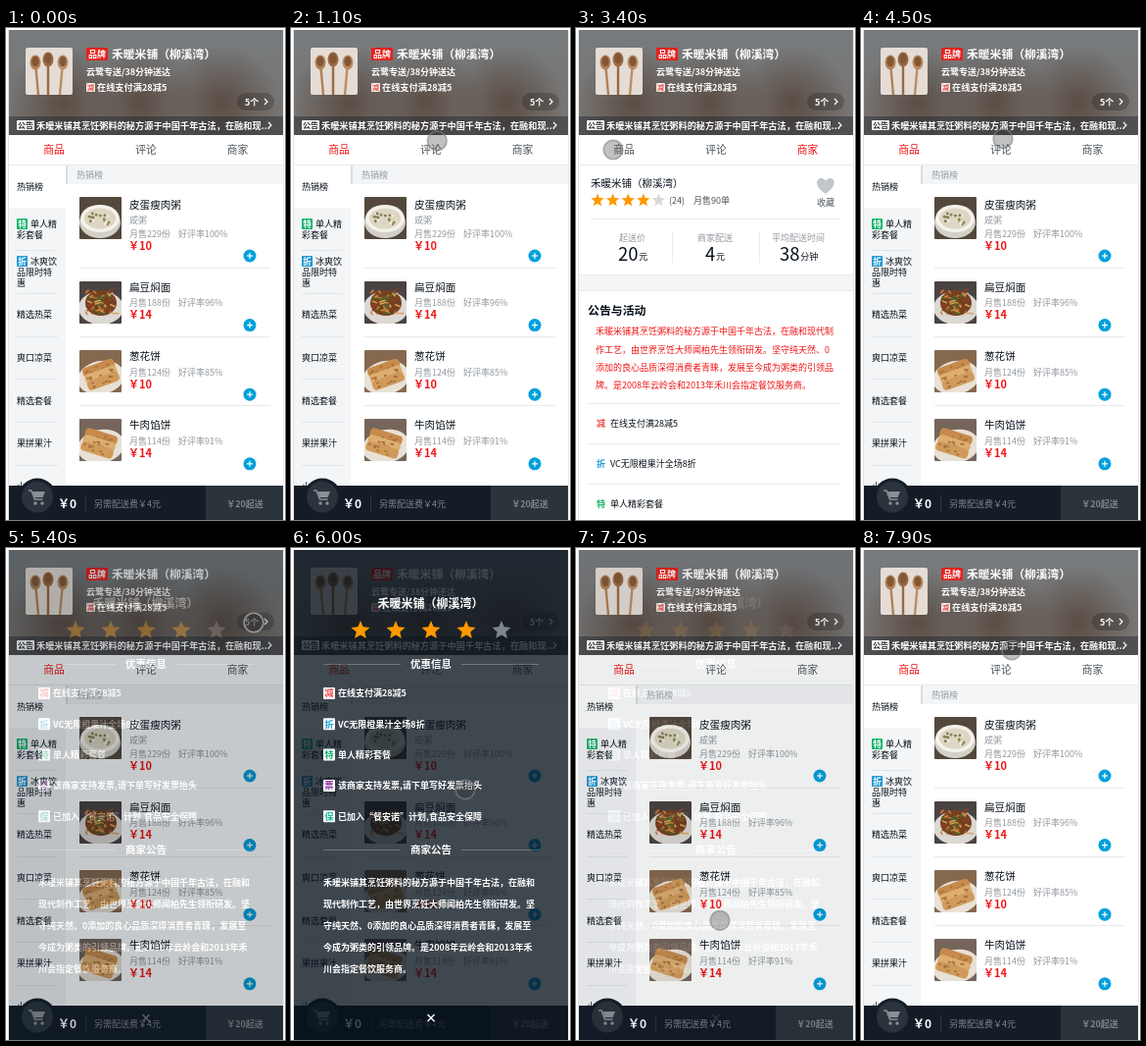
These frames come from a looping animation (285 by 501 pixels, 8000 ms). An HTML page with a canvas:

```html
<!DOCTYPE html>
<html lang="zh-CN">
<head>
<meta charset="utf-8">
<title>外卖商家</title>
<style>
html, body { margin: 0; width: 100%; height: 100%; overflow: hidden; background: #fff; }
canvas { display: block; width: 285px; height: 501px; }
</style>
</head>
<body>
<canvas id="stage"></canvas>
<script>
const W = 285, H = 501, LOOP = 8000, STEP = 100;
const FONT = '"Noto Sans CJK SC", "Noto Sans CJK", sans-serif';
const RED = '#f01414', BLUE = '#00a0dc', ORANGE = '#ff9900', INK = '#07111b',
      GREY = '#93999f', MID = '#4d555d', PALE = '#f3f5f7', LINE = '#e8ebed', GREEN = '#12b26a';
const SHOP = '禾暖米铺（柳溪湾）';
const STORY = '禾暖米铺其烹饪粥料的秘方源于中国千年古法，在融和现代制作工艺，由世界烹饪大师闻柏先生领衔研发。坚守纯天然、0添加的良心品质深得消费者青睐，发展至今成为粥类的引领品牌。是2008年云岭会和2013年禾川会指定餐饮服务商。';
const OFFERS = [['减', '#f0453f', '在线支付满28减5'], ['折', '#1a9bd7', 'VC无限橙果汁全场8折'],
  ['特', GREEN, '单人精彩套餐'], ['票', '#8b2fa0', '该商家支持发票,请下单写好发票抬头'],
  ['保', '#1cb5a3', '已加入“餐安诺”计划,食品安全保障']];

const dpr = window.devicePixelRatio || 1;
function prepare(canvas) {
  canvas.width = W * dpr;
  canvas.height = H * dpr;
  const ctx = canvas.getContext('2d');
  ctx.scale(dpr, dpr);
  return ctx;
}
const stage = prepare(document.getElementById('stage'));
const popup = prepare(document.createElement('canvas'));
let c = stage;

// y is the vertical centre of the glyphs
function text(s, x, y, size = 9, color = INK, weight = 400, align = 'left') {
  c.font = `${weight} ${size}px ${FONT}`;
  c.textAlign = align;
  c.fillStyle = color;
  c.fillText(s, x, y + size * 0.37);
}
function rect(x, y, w, h, color) {
  c.fillStyle = color;
  c.fillRect(x, y, w, h);
}
function round(x, y, w, h, r, color) {
  c.fillStyle = color;
  c.beginPath();
  c.roundRect(x, y, w, h, r);
  c.fill();
}
function disc(x, y, r, color, ry = r, turn = 0) {
  c.fillStyle = color;
  c.beginPath();
  c.ellipse(x, y, r, ry, turn, 0, 7);
  c.fill();
}
function stroke(points, color, width = 1) {
  c.strokeStyle = color;
  c.lineWidth = width;
  c.beginPath();
  points.forEach(([x, y]) => c.lineTo(x, y));
  c.stroke();
}
const hline = (x1, x2, y, color = LINE) => rect(x1, y, x2 - x1, 1, color);
const vline = (x, y1, y2, color = LINE) => rect(x, y1, 1, y2 - y1, color);
const chevron = (x, y) => stroke([[x - 1.5, y - 3], [x + 1.5, y], [x - 1.5, y + 3]], '#fff', 1.2);
function badge(glyph, x, y, size, bg, fg) {
  round(x, y, size, size, 1, bg);
  text(glyph, x + size / 2, y + size / 2, size * 0.78, fg, 700, 'center');
}
function star(x, y, r, color) {
  c.fillStyle = color;
  c.beginPath();
  for (let i = 0; i < 10; i++) {
    const a = i * Math.PI / 5 - Math.PI / 2, d = i % 2 ? r * 0.45 : r;
    c.lineTo(x + d * Math.cos(a), y + d * Math.sin(a));
  }
  c.fill();
}
function stars(x, y, r, gap, full, off = '#d5d8db') {
  for (let i = 0; i < 5; i++) star(x + i * gap, y, r, i < full ? ORANGE : off);
}
function band(y, h) {
  rect(3, y, 280, h, PALE);
  hline(3, 283, y);
  hline(3, 283, y + h - 1);
}
function random(seed) {
  return () => (seed = (seed * 16807) % 2147483647) / 2147483647;
}
function clipBox(x, y, w, h, r, draw) {
  c.save();
  c.beginPath();
  c.roundRect(x, y, w, h, r);
  c.clip();
  c.translate(x, y);
  draw();
  c.restore();
}

function shopPhoto() {
  clipBox(20, 20, 48, 48, 2, () => {
    rect(0, 0, 48, 48, '#e4dcd5');
    [[10, 15, '#b08157'], [23, 12, '#9a6a44'], [38, 15, '#bb8d64']].forEach(([x, y, color], i) => {
      stroke([[x, y], [x + 3 - i * 3, 48]], color, 2.4);
      disc(x, y, 5.5, color, 7.5);
      disc(x, y - 1, 3.6, '#835736', 5.2);
    });
  });
}
function dish(kind, x, y) {
  const rnd = random(kind * 977 + 41);
  clipBox(x, y, 43, 43, 1, () => {
    if (kind === 0) {
      rect(0, 0, 43, 43, '#54483d');
      disc(21, 26, 21, '#d3d0c8', 16);
      disc(21, 22, 20, '#f3f1ea', 14);
      disc(21, 22, 16, '#dcd6c2', 10.5);
      for (let i = 0; i < 18; i++)
        disc(10 + rnd() * 22, 15 + rnd() * 13, 1.4, ['#7c8c4b', '#f0ead6', '#8b745a'][i % 3]);
    } else if (kind === 1) {
      rect(0, 0, 43, 43, '#4a4341');
      disc(22, 27, 23, '#dcd8d4', 17);
      disc(22, 22, 16, '#74401f', 13);
      for (let i = 0; i < 46; i++) {
        const px = 6 + rnd() * 27, py = 9 + rnd() * 24;
        stroke([[px, py], [px + rnd() * 9, py + rnd() * 8 - 4]],
          ['#c88338', '#8f4020', '#4f6a2c', '#d9a25a'][i % 4], 1.5);
      }
    } else {
      rect(0, 0, 43, 43, kind === 2 ? '#85694f' : '#75655a');
      disc(22, 28, 24, '#e8e1d6', 17, -0.2);
      c.translate(21, 22);
      c.rotate(kind === 2 ? -0.35 : 0.3);
      for (let i = 0; i < 3; i++) {
        round(-17, i * 7 - 9, 34, 10, 4, ['#c78b4c', '#dcae70', '#cf9a5a'][i]);
        for (let j = 0; j < 8; j++) disc(rnd() * 28 - 14, i * 7 - 6 + rnd() * 5, 1.6, '#a8703a', 0.9);
      }
    }
  });
}

function header() {
  const g = c.createLinearGradient(0, 2, 0, 109);
  g.addColorStop(0, '#777b7e');
  g.addColorStop(1, '#77726e');
  rect(3, 2, 280, 107, g);
  clipBox(3, 2, 280, 107, 0, () => {
    [56, 134, 218].forEach(x => {
      const b = c.createRadialGradient(x, 74, 4, x, 74, 58);
      b.addColorStop(0, 'rgba(78,60,48,.65)');
      b.addColorStop(1, 'rgba(78,60,48,0)');
      rect(0, 0, 280, 107, b);
    });
  });
  shopPhoto();
  round(82, 20, 22, 13, 1, '#e4211d');
  text('品牌', 93, 26.5, 9, '#fff', 700, 'center');
  text(SHOP, 108, 26.5, 11.8, '#fff', 700);
  text('云鹭专送/38分钟送达', 82, 44.5, 9, '#fff', 700);
  badge('减', 82, 56, 9, '#f7e9e7', '#e05048');
  text('在线支付满28减5', 93, 61, 9.2, '#fff', 700);
  round(236, 66, 38, 18, 9, 'rgba(0,0,0,.2)');
  text('5个', 244, 75.5, 9, '#fff', 700);
  chevron(265.5, 75);
  rect(3, 90, 280, 19, 'rgba(7,17,27,.35)');
  round(11, 94, 18, 10, 1, '#fff');
  text('公告', 20, 99, 8, '#333', 700, 'center');
  text(STORY.slice(0, 25) + '...', 31, 99.5, 9.2, '#fff', 700);
  chevron(269.5, 99);
}
function tabs(active) {
  ['商品', '评论', '商家'].forEach((s, i) =>
    text(s, [49, 143, 236.5][i], 124.5, 10.8, i === active ? RED : MID, 400, 'center'));
  hline(3, 283, 139);
}

function goods() {
  rect(3, 140, 58, 361, PALE);
  rect(3, 140, 58, 43, '#fff');
  text('热销榜', 11, 162);
  badge('特', 11, 194, 11, GREEN, '#fff');
  text('单人精', 25, 199.5);
  text('彩套餐', 11, 211);
  badge('折', 11, 232, 11, '#2299d6', '#fff');
  text('冰爽饮', 25, 237.5);
  text('品限时特', 11, 249);
  text('惠', 11, 260);
  ['精选热菜', '爽口凉菜', '精选套餐', '果拼果汁', '小吃主食'].forEach((s, i) => text(s, 11, 292 + i * 43.7));
  for (let i = 0; i < 6; i++) hline(11, 53, Math.round(226 + i * 43.8), '#e2e5e8');

  rect(61, 140, 222, 19, PALE);
  rect(61, 140, 2, 19, '#d9dde1');
  text('热销榜', 72, 150, 9, GREY);
  [['皮蛋瘦肉粥', 229, 100, 10, 172, 180, 210], ['扁豆焖面', 188, 96, 14, 258, 264, 280],
   ['葱花饼', 124, 85, 10, 328, 334, 351], ['牛肉馅饼', 114, 91, 14, 398, 404, 421]]
    .forEach(([name, sold, rate, price, top, y, meta], i) => {
      dish(i, 75, top);
      text(name, 126, y, 10.6);
      if (i === 0) text('咸粥', 126, 195.5, 9, GREY);
      text(`月售${sold}份`, 126, meta, 9, GREY);
      text(`好评率${rate}%`, 176, meta, 9, GREY);
      text('￥' + price, 125, meta + 11.8, 11, RED, 700);
      const py = 232 + i * 70.6;
      disc(249, py, 6.5, BLUE);
      stroke([[246, py], [252, py]], '#fff', 1.2);
      stroke([[249, py - 3], [249, py + 3]], '#fff', 1.2);
      if (i < 3) hline(75, 270, 244 + i * 70);
    });
  cart();
}
function cart() {
  rect(3, 466, 280, 35, '#141d27');
  rect(204, 466, 79, 35, '#2b333b');
  disc(32, 477.5, 19, '#141d27');
  disc(32, 477.5, 16, '#2b343c');
  const grey = '#8b9095';
  stroke([[23, 471], [26, 471], [29.5, 480], [37.5, 480]], grey, 1.6);
  c.fillStyle = grey;
  c.beginPath();
  [[27, 472], [40, 472], [37.5, 478], [29.5, 478]].forEach(([x, y]) => c.lineTo(x, y));
  c.fill();
  disc(30, 484, 1.7, grey);
  disc(37, 484, 1.7, grey);
  text('￥0', 53, 484.5, 12, '#fff', 700);
  vline(81, 476, 493, '#2c353e');
  text('另需配送费￥4元', 90, 484.5, 9, '#80858a');
  text('￥20起送', 244, 484.5, 9, '#80858a', 700, 'center');
}

function face(x, y) {
  clipBox(x - 10.5, y - 10.5, 21, 21, 10.5, () => {
    rect(0, 0, 21, 21, '#c3dcf2');
    disc(10.5, 8, 4, '#4f86c0');
    disc(10.5, 20, 8, '#4f86c0', 7);
  });
}
function thumb(y) {
  rect(45, y - 1, 2, 5, '#b7bbbf');
  round(48, y - 1, 6, 5, 1, '#b7bbbf');
  stroke([[49, y], [51, y - 4]], '#b7bbbf', 1.8);
}
function review(y, user, clock, score) {
  face(26, y + 5);
  text(user, 45, y, 9);
  text('2016-07-23 ' + clock, 270, y, 9.2, GREY, 400, 'right');
  stars(50, y + 11.5, 5, 11.2, score);
}
function ratings() {
  text('4.2', 47.5, 161.5, 18, ORANGE, 400, 'center');
  text('综合评分', 47, 177.5, 9, INK, 400, 'center');
  text('高于周边商家69.2%', 7, 192, 9, GREY);
  vline(93, 152, 201);
  ['服务态度', '服务态度', '送达时间'].forEach((s, i) => text(s, 103, [160.5, 180, 195][i]));
  [['4.1', 161], ['4.3', 180]].forEach(([s, y]) => {
    stars(158, y, 7.3, 15.8, 4);
    text(s, 232, y - 0.5, 9, ORANGE, 500);
  });
  text('38分钟', 151, 195, 9, GREY);
  band(217, 17);
  [['全部 24', 15, 51, BLUE, '#fff'], ['满意 18', 72, 51, '#ccecf8', MID], ['不满意 6', 129, 55, '#dbdddf', MID]]
    .forEach(([s, x, w, bg, fg], i) => {
      round(x, 247, w, 24, 1, bg);
      text(s, x + w / 2, 259.5, 9.2, fg, i ? 400 : 700, 'center');
    });
  hline(15, 270, 284);
  disc(24, 302, 8, GREY);
  stroke([[20, 302], [23, 305], [28, 299]], '#fff', 1.6);
  text('只看有内容的评价', 36, 302.5, 9, GREY);
  hline(3, 283, 319);

  review(340, '7******k', '21:52:44', 5);
  text('30分钟送达', 106, 352, 9, GREY);
  text('不错,粥很好喝,我经常吃这一家,非常赞,以后也会常来', 45, 366);
  text('吃,强烈推荐.', 45, 380);
  thumb(398);
  [['南瓜粥', 61], ['皮蛋瘦肉粥', 95], ['扁豆焖面', 148], ['娃娃菜炖豆腐', 191]]
    .forEach(([s, x]) => text(s, x, 399, 9, GREY));
  text('牛肉馅饼', 61, 414, 9, GREY);
  hline(15, 270, 435);
  review(454.5, '5******8', '18:54:24', 4);
  text('服务态度不错', 45, 480.5);
  thumb(497);
  text('扁豆焖面', 61, 498, 9, GREY);
}

function seller() {
  text(SHOP, 15, 158.5, 10.5);
  stars(22, 175.5, 7, 15.6, 4);
  text('(24)', 95, 176, 9, MID);
  text('月售90单', 120, 176, 9, MID);
  c.fillStyle = '#c3c6c9';
  c.beginPath();
  c.moveTo(255, 169);
  c.bezierCurveTo(238, 158, 250, 148, 255, 156);
  c.bezierCurveTo(260, 148, 272, 158, 255, 169);
  c.fill();
  text('收藏', 255, 178, 9, MID, 400, 'center');
  hline(15, 270, 194);
  [['起送价', 57.5, '20', 43, '元'], ['商家配送', 142, '4', 132, '元'], ['平均配送时间', 227, '38', 208, '分钟']]
    .forEach(([label, x, n, nx, unit]) => {
      text(label, x, 214, 9, GREY, 400, 'center');
      text(n, nx, 230, 18.5);
      text(unit, nx + n.length * 10.4 + 0.5, 233, 9);
    });
  vline(98, 207, 239);
  vline(187, 207, 239);
  band(251, 17);
  text('公告与活动', 12, 288, 11.9, INK, 700);
  [[0, 27], [27, 54], [54, 81], [81]].forEach(([a, b], i) => text(STORY.slice(a, b), 20, 309 + i * 18.2, 9, RED));
  OFFERS.slice(0, 3).forEach(([glyph, color, label], i) => {
    const y = 403 + i * 41;
    hline(12, 270, y - 21);
    text(glyph, 21, y, 9, color, 700);
    text(label, 35, y);
  });
}

function details() {
  rect(3, 2, 280, 499, 'rgba(7,17,27,.77)');
  text(SHOP, 142.5, 57, 12, '#fff', 700, 'center');
  stars(71, 84, 10, 36, 4, '#7f868c');
  [['优惠信息', 118], ['商家公告', 307]].forEach(([s, y]) => {
    text(s, 143, y, 10.5, '#fff', 700, 'center');
    hline(33, 112, y, 'rgba(255,255,255,.25)');
    hline(174, 253, y, 'rgba(255,255,255,.25)');
  });
  OFFERS.forEach(([glyph, color, label], i) => {
    const y = 148 + i * 31.3;
    badge(glyph, 33, y - 6, 12, '#fff', color);
    text(label, 48, y, 9, '#fff', 700);
  });
  [[0, 24], [24, 48], [48, 72], [72, 99], [99]].forEach(([a, b], i) =>
    text(STORY.slice(a, b), 33, 341 + i * 22, 9, '#fff', 700));
  stroke([[139.5, 475], [146.5, 482]], '#fff', 1.5);
  stroke([[146.5, 475], [139.5, 482]], '#fff', 1.5);
}

// time, x, y of the touch point
const PATH = [[300, 300, 176], [400, 284, 169], [600, 252, 118], [800, 205, 78], [1000, 160, 105],
  [1200, 138.5, 125], [1700, 138.5, 125], [1800, 144, 129], [2100, 182, 136], [2500, 236, 125],
  [2900, 236, 125], [3200, 120, 127], [3400, 38, 124], [4000, 38, 124], [4300, 75, 128],
  [4600, 180, 105], [4900, 253, 76], [5400, 253, 76], [5700, 226, 128], [6000, 178, 246],
  [6200, 159, 356], [6700, 145, 478], [7000, 145, 478], [7300, 148, 330], [7500, 152, 190],
  [7700, 155, 119], [7900, 154, 104]];
const within = (t, ...spans) => spans.some(([a, b]) => t >= a && t < b);

function pointer(t) {
  if (t < 400) return;
  const i = PATH.findIndex(p => p[0] >= t);
  const [t0, x0, y0] = PATH[i - 1], [t1, x1, y1] = PATH[i];
  const k = (t - t0) / (t1 - t0), x = x0 + (x1 - x0) * k, y = y0 + (y1 - y0) * k;
  const pressed = within(t, [1300, 1900], [5300, 5500], [6900, 7100]);
  disc(x, y, 10, `rgba(50,50,50,${pressed ? 0.5 : 0.3})`);
  c.strokeStyle = pressed ? 'rgba(170,170,170,.8)' : 'rgba(135,135,135,.6)';
  c.lineWidth = 1.6;
  c.beginPath();
  c.arc(x, y, 9.8, 0, 7);
  c.stroke();
}

// the CSS "ease" curve, solved by bisection
function ease(x) {
  if (x <= 0 || x >= 1) return x <= 0 ? 0 : 1;
  let a = 0, b = 1, u;
  for (let i = 0; i < 20; i++) {
    u = (a + b) / 2;
    if (0.75 * u * (1 - u) ** 2 + 0.75 * u * u * (1 - u) + u ** 3 < x) a = u; else b = u;
  }
  return 0.3 * u * (1 - u) ** 2 + 3 * u * u * (1 - u) + u ** 3;
}

function draw(now) {
  const t = Math.floor((now % LOOP) / STEP) * STEP;
  const page = within(t, [1600, 2900]) ? 1 : within(t, [2900, 3800]) ? 2 : 0;
  rect(0, 0, W, H, '#fff');
  [goods, ratings, seller][page]();
  tabs(page);
  header();
  vline(2, 2, H, '#dfe2e4');
  vline(283, 2, H, '#e6e8ea');
  // the popup fades as one layer
  c.globalAlpha = ease((t - 5300) / 500) - ease((t - 6880) / 500);
  c.drawImage(popup.canvas, 0, 0, W, H);
  c.globalAlpha = 1;
  pointer(t);
}

c = popup;
details();
c = stage;
const start = performance.now();
function tick() {
  draw(performance.now() - start);
  requestAnimationFrame(tick);
}
tick();
</script>
</body>
</html>
```
